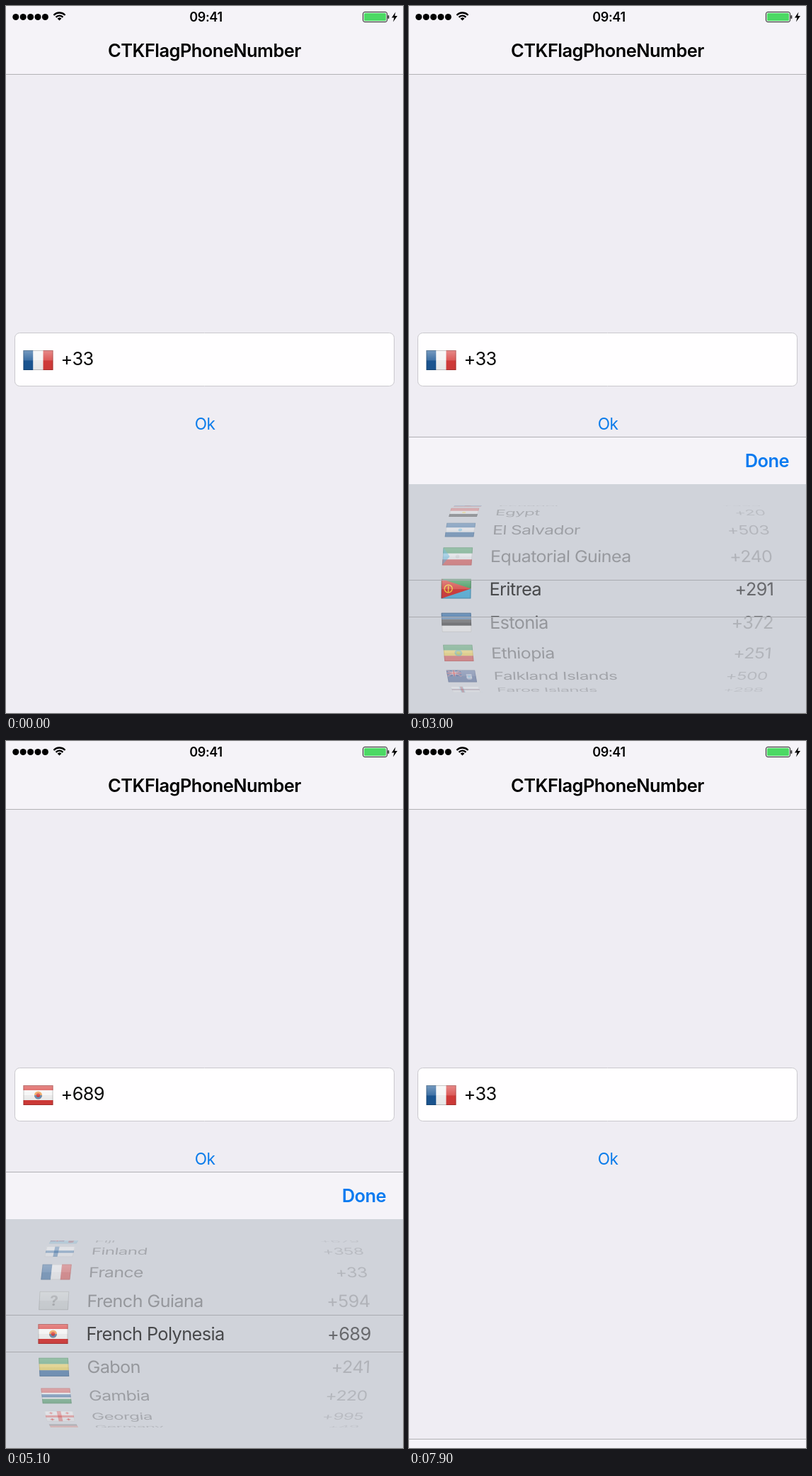
Write an HTML page with a canvas that moves like this. It is 561 px wide and 998 px high and loops after 8 s.

```html
<!DOCTYPE html>
<html lang="en">
<head>
<meta charset="utf-8">
<title>Phone number picker</title>
<style>
html, body { margin: 0; width: 100%; height: 100%; overflow: hidden; background: #efedf3; }
canvas { display: block; }
</style>
</head>
<body>
<canvas id="stage" width="561" height="998"></canvas>
<script>
const ctx = document.getElementById('stage').getContext('2d');
const W = 561, H = 998, MID = 280.5, LOOP = 8000;
const BLUE = '#0b7cea', BAR = '#f5f3f8';

const COLORS = {
  w: '#f4f4f4', r: '#d63c3a', b: '#1b5795', g: '#2f8f4e', y: '#f0cf3f',
  k: '#222222', l: '#5fb4dc', n: '#24407f', s: '#c6c9cc', d: '#8b8e92', o: '#ee9a4a'
};

// name, code, stripes (one letter each, | = vertical), marks as shape + colour pairs
const ROWS = [
  ['Ecuador', 593, 'yybr', 'or'],
  ['Egypt', 20, 'rwk', 'py'],
  ['El Salvador', 503, 'bwb', 'pl'],
  ['Equatorial Guinea', 240, 'gwr', 'tlps'],
  ['Eritrea', 291, 'gl', 'TrOy'],
  ['Estonia', 372, 'bkw', ''],
  ['Ethiopia', 251, 'gyr', 'olpy'],
  ['Falkland Islands', 500, 'n', 'jwcw'],
  ['Faroe Islands', 298, 'w', 'Xlxr'],
  ['Fiji', 679, 'l', 'jwcr'],
  ['Finland', 358, 'w', 'Xb'],
  ['France', 33, '|bwr', ''],
  ['French Guiana', 594, 's', '?d'],
  ['French Polynesia', 689, 'rwwr', 'oouipr'],
  ['Gabon', 241, 'gyb', ''],
  ['Gambia', 220, 'rrrwbbwggg', ''],
  ['Georgia', 995, 'w', '#r'],
  ['Germany', 49, 'kry', '']
];
COLORS.i = '#6a93bb';
const FRANCE = 11, POLYNESIA = 13;

// time in ms, row at the centre of the wheel
const SCROLL = [
  [2200, 11], [3000, 4.3], [3150, 4.1], [3800, 9.614],
  [4700, 13], [5200, 13], [6300, 10.094], [7100, 11]
];

function rect(color, x, y, w, h) {
  ctx.fillStyle = color;
  ctx.fillRect(x, y, w, h);
}

function disc(color, x, y, r, end = 7) {
  ctx.fillStyle = color;
  ctx.beginPath();
  ctx.arc(x, y, r, 0, end);
  ctx.fill();
}

function poly(color, ...pts) {
  ctx.fillStyle = color;
  ctx.beginPath();
  for (let i = 0; i < pts.length; i += 2) ctx.lineTo(pts[i], pts[i + 1]);
  ctx.fill();
}

function line(color, width, x1, y1, x2, y2) {
  ctx.strokeStyle = color;
  ctx.lineWidth = width;
  ctx.beginPath();
  ctx.moveTo(x1, y1);
  ctx.lineTo(x2, y2);
  ctx.stroke();
}

function setFont(size, weight = 400) {
  ctx.font = `${weight} ${size}px Inter, "Liberation Sans", sans-serif`;
  ctx.letterSpacing = -size * (weight > 400 ? 0.02 : 0.025) + 'px';
}

function label(str, x, y, size, color, align = 'left', weight = 400) {
  setFont(size, weight);
  ctx.textAlign = align;
  ctx.fillStyle = color;
  ctx.fillText(str, x, y);
}

// Marks are drawn in a 42 x 28 box around the origin.
const MARKS = {
  o: c => disc(c, 0, 0, 5.5),
  p: c => disc(c, 0, 0, 2.8),
  u: c => disc(c, 0, 0, 5.5, Math.PI),
  O: c => {
    ctx.strokeStyle = c;
    ctx.lineWidth = 1.5;
    ctx.beginPath();
    ctx.arc(-11, 0, 5.5, 0, 7);
    ctx.stroke();
    line(c, 1.5, -11, -4, -11, 5);
  },
  t: c => poly(c, -21, -14, -11, 0, -21, 14),
  T: c => poly(c, -21, -14, 21, 0, -21, 14),
  c: c => {
    rect(c, 7, -5, 8, 9);
    disc(c, 11, 4, 4);
    rect(COLORS.l, 9, -1, 4, 4);
  },
  X: c => { rect(c, -8.5, -14, 6.5, 28); rect(c, -21, -3.2, 42, 6.4); },
  x: c => { rect(c, -7.2, -14, 4, 28); rect(c, -21, -2, 42, 4); },
  '#': c => {
    rect(c, -3, -14, 6, 28);
    rect(c, -21, -3, 42, 6);
    for (const x of [-12, 12]) for (const y of [-8.5, 8.5]) {
      rect(c, x - 3, y - 1, 6, 2);
      rect(c, x - 1, y - 3, 2, 6);
    }
  },
  j: c => {
    rect(COLORS.n, -21, -14, 21, 14);
    line(c, 3, -21, -14, 0, 0);
    line(c, 3, -21, 0, 0, -14);
    line(COLORS.r, 1, -21, -14, 0, 0);
    line(COLORS.r, 1, -21, 0, 0, -14);
    for (const [col, w] of [[c, 5], [COLORS.r, 2.6]]) {
      line(col, w, -10.5, -14, -10.5, 0);
      line(col, w, -21, -7, 0, -7);
    }
  },
  '?': c => label('?', 0, 7.5, 21, c, 'center', 700)
};

function gloss() {
  const g = ctx.createLinearGradient(0, -14, 0, 14);
  g.addColorStop(0, 'rgba(255,255,255,.4)');
  g.addColorStop(0.5, 'rgba(255,255,255,.16)');
  g.addColorStop(0.55, 'rgba(0,0,0,.03)');
  g.addColorStop(1, 'rgba(0,0,0,.06)');
  return g;
}

function flag(stripes, marks) {
  const vertical = stripes[0] === '|';
  const bands = vertical ? stripes.slice(1) : stripes;
  const n = bands.length;
  [...bands].forEach((b, i) => {
    if (vertical) rect(COLORS[b], -21 + 42 * i / n, -14, 42 / n, 28);
    else rect(COLORS[b], -21, -14 + 28 * i / n, 42, 28 / n);
  });
  ctx.save();
  ctx.beginPath();
  ctx.rect(-21, -14, 42, 28);
  ctx.clip();
  for (let i = 0; i < marks.length; i += 2) MARKS[marks[i]](COLORS[marks[i + 1]]);
  ctx.restore();
  rect(gloss(), -21, -14, 42, 28);
  ctx.strokeStyle = 'rgba(0,0,0,.2)';
  ctx.lineWidth = 1;
  ctx.strokeRect(-20.5, -13.5, 41, 27);
}

function wifi(x, y) {
  ctx.strokeStyle = '#000';
  ctx.lineWidth = 2.3;
  for (const r of [6.8, 11]) {
    ctx.beginPath();
    ctx.arc(x, y, r, -Math.PI * 0.76, -Math.PI * 0.24);
    ctx.stroke();
  }
  ctx.fillStyle = '#000';
  ctx.beginPath();
  ctx.moveTo(x, y);
  ctx.arc(x, y, 4, -Math.PI * 0.76, -Math.PI * 0.24);
  ctx.fill();
}

function box(x, y, w, h, r, fill, stroke) {
  ctx.beginPath();
  ctx.roundRect(x, y, w, h, r);
  ctx.fillStyle = fill;
  ctx.fill();
  if (!stroke) return;
  ctx.strokeStyle = stroke;
  ctx.lineWidth = 1;
  ctx.stroke();
}

function page(selected) {
  rect('#efedf3', 0, 0, W, H);
  rect(BAR, 0, 0, W, 96);
  rect('#b3b2b6', 0, 96, W, 1);
  for (let i = 0; i < 5; i++) disc('#000', 13.8 + i * 10.4, 15.5, 4.5);
  wifi(75.5, 20.5);
  label('09:41', 282.5, 21.5, 18, '#000', 'center', 600);
  box(504.5, 8.5, 34, 14, 2.5, BAR, '#222');
  box(506, 10, 31, 11, 1.5, '#4cd964');
  box(539.5, 13, 1.8, 5, 1, '#222');
  poly('#000', 550.5, 8.5, 545, 16.5, 548.5, 16.5, 547, 22.5, 553, 14, 549.3, 14);
  label('CTKFlagPhoneNumber', 280.5, 72, 25.4, '#000', 'center', 600);

  box(12.5, 461.5, 536, 75, 7, '#fffeff', '#c9c8cd');
  const [, code, stripes, marks] = ROWS[selected];
  ctx.save();
  ctx.translate(45.5, 500);
  flag(stripes, marks);
  ctx.restore();
  label('+' + code, 77.5, 507, 25.4, '#0a0a0a');
  label('Ok', 281, 597.5, 22.6, BLUE, 'center');
}

// Rows sit on a cylinder seen in perspective.
const RADIUS = 145, STEP = 19 * Math.PI / 180, DEPTH = 1420;

function wheelRow(row, angle, y, inBand) {
  const sin = Math.sin(angle), cos = Math.cos(angle);
  const s = DEPTH / (DEPTH + RADIUS * (1 - cos));
  const place = (x, alpha, draw) => {
    ctx.save();
    ctx.globalAlpha = alpha;
    ctx.transform(s, 0, (MID - x) * s * s * sin / DEPTH, s * cos,
      MID + (x - MID) * s, y + RADIUS * sin * s);
    draw();
    ctx.restore();
  };
  const [name, code, stripes, marks] = row;
  const fade = Math.pow(cos, 0.6);
  place(66.5, inBand ? 0.95 : 0.52 * fade, () => flag(stripes, marks));

  setFont(25.4);
  const nameX = 113.5 + ctx.measureText(name).width / 2;
  place(nameX, inBand ? 0.66 : 0.29 * fade,
    () => label(name, 0, 9, 25.4, '#000', 'center'));
  place(485, inBand ? 0.5 : 0.16 * fade,
    () => label('+' + code, 30.5, 9, 25.4, '#000', 'right'));
}

function panel(top, pos) {
  rect(BAR, 0, top, W, 67);
  rect('#b0b0b4', 0, top, W, 1);
  label('Done', 537, top + 43, 25.4, '#087af0', 'right', 600);
  rect('#d0d3da', 0, top + 67, W, H);

  const y = top + 229;
  for (const inBand of [false, true]) {
    ctx.save();
    ctx.beginPath();
    ctx.rect(0, y - 26, W, 52);
    if (!inBand) ctx.rect(0, y - 132, W, 264);
    ctx.clip('evenodd');
    ROWS.forEach((row, i) => {
      const angle = (i - pos) * STEP;
      if (Math.abs(angle) < Math.PI / 2) wheelRow(row, angle, y, inBand);
    });
    ctx.restore();
  }
  rect('#a9abb0', 0, top + 202, W, 1);
  rect('#a9abb0', 0, top + 254, W, 1);
}

// Monotone cubic through the scroll keys.
function scrollAt(t) {
  const last = SCROLL.length - 1;
  if (t <= SCROLL[0][0]) return SCROLL[0][1];
  if (t >= SCROLL[last][0]) return SCROLL[last][1];
  const i = SCROLL.findIndex(k => k[0] > t) - 1;
  const rate = j => (SCROLL[j + 1][1] - SCROLL[j][1]) / (SCROLL[j + 1][0] - SCROLL[j][0]);
  const slope = j => {
    if (j === 0 || j === last) return 0;
    const a = rate(j - 1), b = rate(j);
    return a * b <= 0 ? 0 : 2 * a * b / (a + b);
  };
  const [t0, p0] = SCROLL[i], [t1, p1] = SCROLL[i + 1];
  const h = t1 - t0, u = (t - t0) / h, v = 1 - u;
  return v * v * (1 + 2 * u) * p0 + u * u * (1 + 2 * v) * p1
    + h * u * v * (v * slope(i) - u * slope(i + 1));
}

// What is left of a critically damped spring's travel.
function spring(t, start) {
  const u = Math.max(0, t - start) * 0.01826;
  return (1 + u) * Math.exp(-u);
}

function draw(now) {
  const t = Math.floor(now % LOOP / 100) * 100;
  page(t >= 4700 && t < 7100 ? POLYNESIA : FRANCE);
  const hidden = spring(t, 1215) + 1 - spring(t, 7615);
  const top = Math.round(608 + 390 * hidden);
  if (top < H) panel(top, scrollAt(t));
}

const start = performance.now();
function tick() {
  draw(performance.now() - start);
  requestAnimationFrame(tick);
}
tick();
</script>
</body>
</html>
```
